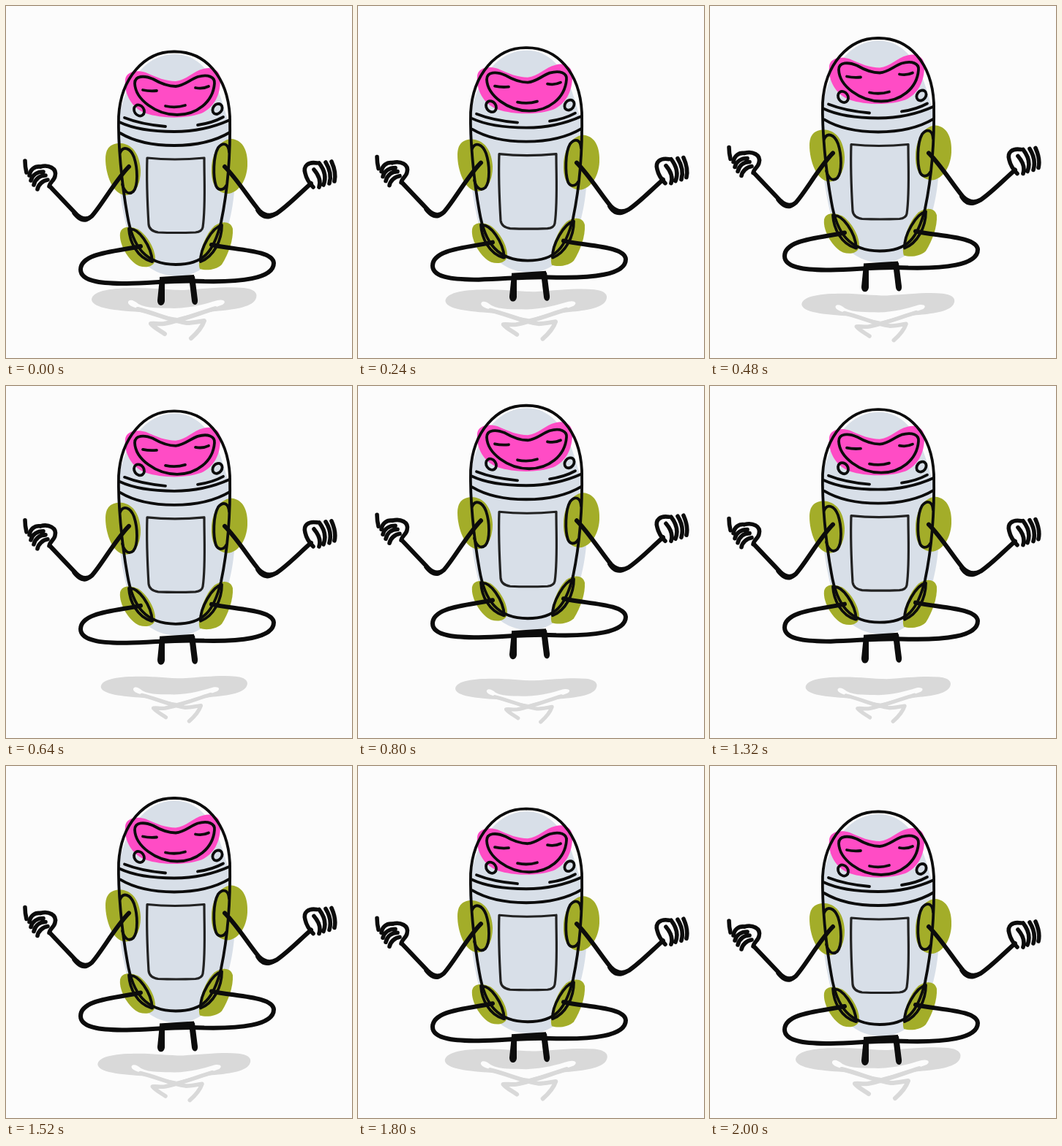
An HTML page that plays this animation: 473 by 482 pixels, repeating every 2040 ms.

```html
<!DOCTYPE html>
<html lang="en">
<head>
<meta charset="utf-8">
<title>Floating robot</title>
<style>
  @property --tick { syntax: "<number>"; inherits: true; initial-value: 0; }

  html, body { margin: 0; width: 100%; height: 100%; overflow: hidden; background: #fcfcfc; }

  /* 51 held poses of 40 ms; the sine wave itself spans 50 of them */
  svg {
    display: block; width: 473px; height: 482px;
    --rise: calc((1 - cos(var(--tick) * 7.2deg)) / 2);
    animation: tick 2040ms steps(51) infinite;
  }
  @keyframes tick { from { --tick: 0; } to { --tick: 51; } }

  .robot { transform: translateY(calc(var(--rise) * -39.5px)); }
  .shadow {
    transform-origin: 230px 490px;
    transform: scale(calc(1 - 0.157 * var(--rise)));
  }

  .line { fill: none; stroke: #0c0c0c; stroke-width: 3.8; stroke-linecap: round; stroke-linejoin: round; }
  .thin { stroke: #222; stroke-width: 3.2; }
  .limb { stroke-width: 6; }
  .finger { stroke-width: 5.6; }
  .ink { fill: #0c0c0c; }
  .shell { fill: #d8dfe8; }
  .pink { fill: #ff4cc5; }
  .olive { fill: #a3ad29; }
  .shade { fill: #d9d9d9; }
  .shade-line { fill: none; stroke: #d9d9d9; stroke-width: 6; stroke-linecap: round; stroke-linejoin: round; }
  .gap { fill: #fcfcfc; }
</style>
</head>
<body>
<svg viewBox="0 0 473 482" aria-label="A meditating robot floats up and down">
  <g class="shadow">
    <path class="shade" d="M117 402C118 389 148 386 176 386C205 386 220 389 243 389C275 387 300 384 325 386C342 388 345 395 341 402C335 413 309 416 286 418C262 420 246 428 232 428C216 428 204 420 182 419C151 417 118 414 117 402Z"/>
    <path class="gap" d="M167 405C169 401 175 403 181 408C194 415 212 413 230 414C256 413 272 408 289 403C298 401 302 405 296 409C278 416 257 421 234 427C213 424 194 420 180 414C172 412 166 409 167 405Z"/>
    <path class="shade-line" d="M180 415C205 421 225 431 247 434C256 434 263 432 271 431C268 440 261 448 253 455M286 414C263 421 238 431 216 435C208 436 203 434 198 435C203 441 210 444 217 449"/>
  </g>

  <g class="robot">
    <path class="shell" d="M231 66C262 66 282 92 292 121C302 150 312 184 313 222C314 260 307 302 292 332C279 356 258 370 236 370C206 370 186 355 174 330C160 298 152 240 152 195C152 160 156 132 169 110C182 84 203 66 231 66Z"/>
    <path class="pink" d="M163 101C164 90 178 87 191 91C206 98 219 103 232 103C246 102 256 89 270 86C284 82 294 90 293 102C293 121 285 139 267 147C244 155 213 154 191 147C172 140 161 120 163 101Z"/>

    <g class="olive">
      <path d="M136 209C136 193 145 187 158 188C175 190 183 206 184 225C184 244 177 258 164 259C146 259 136 231 136 209Z"/>
      <path d="M281 222C282 200 293 182 309 182C325 184 331 200 330 219C329 239 318 256 303 257C288 256 280 244 281 222Z"/>
      <path d="M156 311C158 301 170 301 181 306C194 315 204 333 204 347C203 357 192 359 182 356C169 351 154 327 156 311Z"/>
      <path d="M285 301C295 294 307 294 310 305C311 320 304 340 295 354C288 361 274 363 265 360C261 351 268 317 285 301Z"/>
    </g>

    <g class="line">
      <path d="M230 62.500C189 62 157 99 154 151C153 187 158 243 166 287C173 329 190 354 232 354C270 354 284 337 294 296C303 253 307 202 306 151C303 96 272 62 230 62.500Z"/>
      <path d="M176 106C176 95 189 95 201 100C213 107 222 110 232 110C244 109 251 101 262 97C276 93 286 97 285 106C283 132 260 149 234 149C205 149 177 128 176 106Z"/>
      <path d="M187 115Q196 117 206 116M259 112Q269 114 277 110M218 137Q232 140 245 136"/>
      <ellipse cx="182" cy="143" rx="6.500" ry="8" transform="rotate(-35 182 143)"/>
      <ellipse cx="289" cy="141" rx="6" ry="7.500" transform="rotate(38 289 141)"/>
      <path d="M162 153C177 159 196 163 218 165M262 163C276 161 288 157 297 152"/>
      <path d="M155 159C172 167 199 172 230 172C258 172 284 166 306 156M156 174C176 186 202 191 230 191C260 191 286 185 306 173"/>
      <path class="thin" d="M193 208Q230 212 271 208C271 242 273 276 269 303Q268 309 259 310Q232 311 208 310Q196 308 195 299C193 265 192 238 193 208Z"/>
      <path d="M156 201C160 191 170 194 175 207C180 222 181 246 174 254C167 260 161 253 159 244"/>
      <path d="M305 200C304 188 297 186 290 194C283 206 283 234 287 246C290 253 297 253 301 246"/>
      <path d="M169 306C180 302 199 329 200 350M168 305C169 323 179 344 199 350"/>
      <path d="M295 300C282 303 265 332 266 350M295 300C295 321 284 343 266 350"/>
    </g>

    <g class="line limb">
      <path d="M168 220C150 238 130 274 117 288Q107 296 96 285L60 247"/>
      <path d="M299 220C316 237 334 266 346 280Q357 291 370 284C386 273 401 257 417 243"/>
      <path d="M184 329C151 336 102 338 102 361C102 379 138 380 165 380C205 379 234 375 271 377C318 378 366 374 366 352C365 334 312 334 281 327"/>
    </g>
    <g class="ink">
      <path d="M122 281C112 295 103 295 92 281L90 284C100 298 112 301 122 285Z"/>
      <path d="M341 274C351 288 361 289 376 279L376 282C361 296 349 294 341 280Z"/>
      <path d="M210 371L257 368L258 377L210 379Z"/>
      <path d="M210 373L217 373L217 404C216 412 207 412 207 403Z"/>
      <path d="M250 371L258 370L262 402C263 411 255 411 254 404Z"/>
    </g>

    <g class="line finger">
      <path d="M26 212Q26 220 28 228"/>
      <path d="M32 232C33 224 39 219 47 220M34 239C36 231 43 227 51 227M38 245C40 237 46 232 54 232M43 251C44 245 50 239 57 238"/>
      <path d="M47 220C58 217 70 222 67 233C66 239 60 241 59 247"/>
      <path d="M425 215C413 213 406 219 409 229C411 238 415 243 420 248"/>
      <path d="M445 213C449 222 451 232 449 240M437 214C442 222 445 233 442 243M428 215C435 224 438 235 434 245M421 224C427 231 431 239 428 248"/>
    </g>
  </g>
</svg>
</body>
</html>
```
